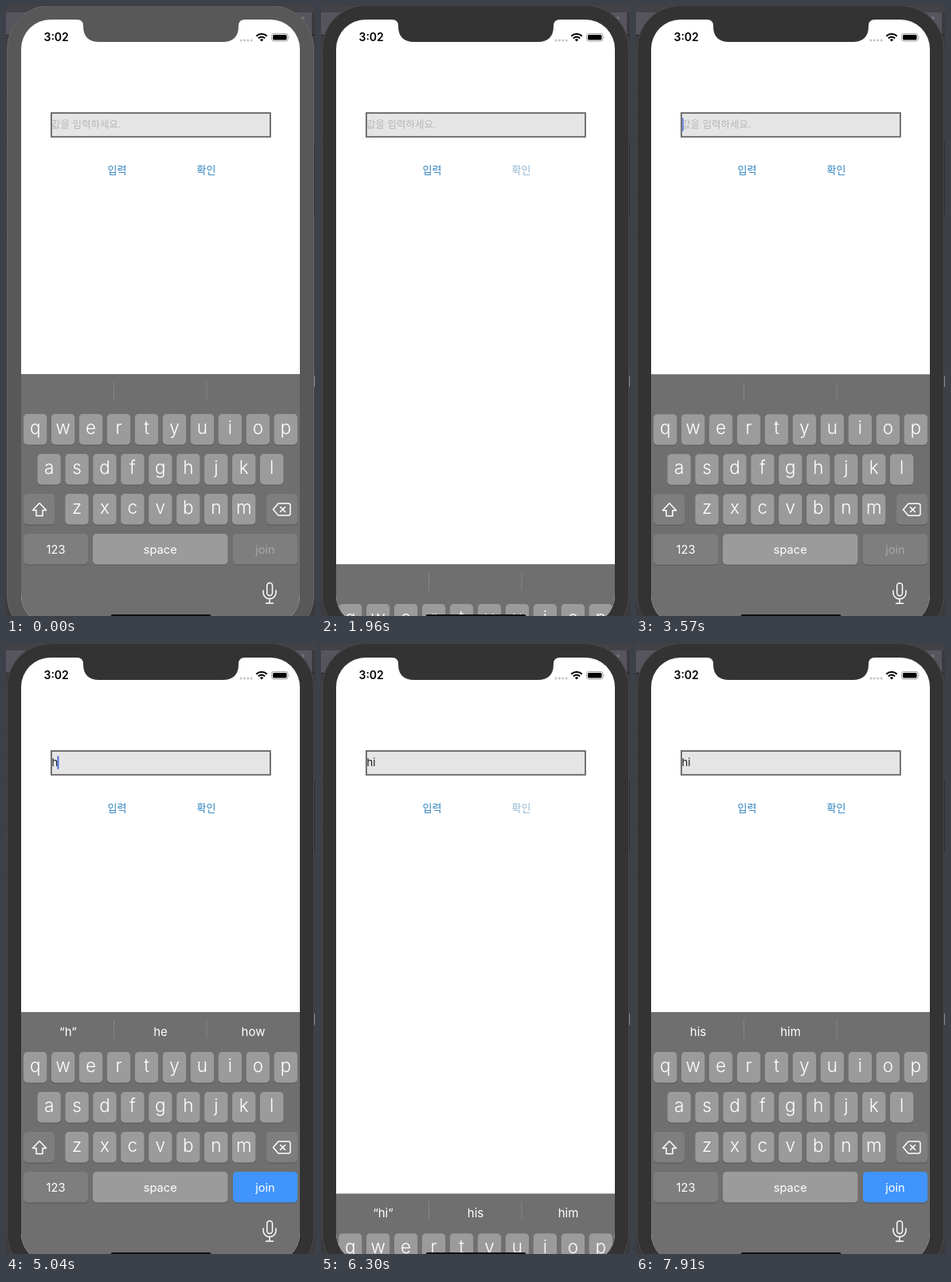
An HTML page for the animation above (8000 ms loop, 388 by 764 pixels).

```html
<!DOCTYPE html>
<html lang="ko">
<head>
<meta charset="utf-8">
<title>Text field and keyboard</title>
<style>
html, body { margin: 0; width: 100%; height: 100%; overflow: hidden; background: #3b3a3e; }
svg { display: block; width: 388px; height: 764px; }
text { font-family: Inter, "Noto Sans", sans-serif; white-space: pre; }
.ko { font-family: "Noto Sans CJK KR", "Noto Sans CJK JP", "Noto Sans CJK", sans-serif; }
.mid { text-anchor: middle; }
.letter { font-size: 22.5px; font-weight: 300; }
.label { font-size: 14.6px; }
.line { fill: none; stroke: #fff; stroke-width: 1.5; stroke-linejoin: round; stroke-linecap: round; }
</style>
</head>
<body>
<svg viewBox="0 0 388 764" xmlns="http://www.w3.org/2000/svg">
  <defs>
    <clipPath id="screen"><rect x="19" y="17" width="350" height="758" rx="37"/></clipPath>
  </defs>

  <!-- window behind the phone -->
  <rect width="388" height="764" fill="#3b3a3e"/>
  <rect width="388" height="8" fill="#434247"/>
  <rect y="8" width="384" height="28" fill="#56545d"/>
  <path d="M0 36.5H388M0 110.5H3M0 142.5H3M0 169.5H3M0 234.5H3M0 290.5H3" stroke="#242424"/>
  <path d="M369 15h5m-2-2.5l2.500 2.500l-2.500 2.500" fill="none" stroke="#85838b"/>
  <rect x="386" y="463" width="2" height="14" fill="#8a8a8a"/>
  <rect x="385" y="170" width="3" height="92" fill="#2a2a2a"/>

  <!-- phone body -->
  <rect id="body" x="1.500" y="-.5" width="385" height="793" rx="54" stroke-width="1"/>

  <g clip-path="url(#screen)">
    <rect x="19" y="17" width="350" height="758" fill="#fff"/>

    <rect x="56.900" y="134" width="275" height="29.800" fill="#e5e5e5" stroke="#646464" stroke-width="1.800"/>
    <text id="hint" class="ko" x="57" y="152.500" font-size="12.500" fill="#b7b7b7">값을 입력하세요.</text>
    <text id="typed" x="57.500" y="153" font-size="13" fill="#161616"></text>
    <rect id="caret" y="140" width="2" height="17" rx="1" fill="#4a6fdf"/>

    <text id="enter" class="ko mid" x="139.500" y="210" font-size="13">입력</text>
    <text id="confirm" class="ko mid" x="251.500" y="210" font-size="13">확인</text>

    <g id="keyboard">
      <rect x="19" y="461" width="350" height="320" fill="#6f6f6f"/>
      <path d="M135.500 471V494M252 471V494" stroke="#858585"/>
      <g id="words" fill="#fff"></g>
      <g id="keys"></g>
      <path class="line" d="M42 622.500L50.500 631.500H46V638.500H38V631.500H33.500Z"/>
      <path class="line" d="M342 623H354.500Q357 623 357 625.500V635.500Q357 638 354.500 638H342L335.500 630.500Z
        M344.500 627.500l6 6m0-6l-6 6"/>
      <rect class="line" x="327.700" y="722.500" width="6.800" height="16" rx="3.400"/>
      <path class="line" d="M323 732V734.500A8 8 0 0 0 339 734.500V732M331 742.500V748M326.500 748H335.500"/>
    </g>
    <rect x="131.500" y="762" width="126" height="5" rx="2.500" fill="#111"/>
  </g>

  <path id="notch" d="M87 16H303V17H300Q292 17 292 25V25Q292 45 272 45H117Q97 45 97 25V25Q97 17 89 17Z"/>

  <!-- status bar -->
  <text x="47.500" y="44" font-size="14" font-weight="600">3:02</text>
  <g id="dots" fill="#c4c4c4"></g>
  <g fill="none" stroke="#000" stroke-width="2.100">
    <path d="M314.300 37.800A9.500 9.500 0 0 1 327.700 37.800"/>
    <path d="M316.900 40.500A5.800 5.800 0 0 1 325.100 40.500"/>
  </g>
  <path d="M321 44.500L318.800 42.300A3.100 3.100 0 0 1 323.200 42.300Z"/>
  <rect x="333.500" y="34.500" width="20.500" height="9.500" rx="2.800" fill="none" stroke="#a2a2a2"/>
  <rect x="335" y="36" width="17.500" height="6.500" rx="1.500"/>
  <path d="M355.300 37.700Q357 39.200 355.300 40.800Z" fill="#a2a2a2"/>
</svg>

<script>
const LOOP = 8000, STEP = 70, TRAVEL = 314;
const $ = id => document.getElementById(id);

function add(parent, tag, attrs, content = '') {
  const el = document.createElementNS('http://www.w3.org/2000/svg', tag);
  for (const name in attrs) el.setAttribute(name, attrs[name]);
  el.textContent = content;
  return parent.appendChild(el);
}

const LETTER = '#9b9b9b', SPECIAL = '#7e7e7e', BLUE = '#4094fc';

function key(x, y, width, fill, text = '', cls = 'label', drop = 24.5) {
  const box = { x, width, height: 38.5, rx: 4.7 };
  add($('keys'), 'rect', { ...box, y: y + 1, fill: '#575757' });
  const face = add($('keys'), 'rect', { ...box, y, fill });
  const label = add($('keys'), 'text',
    { x: x + width / 2, y: y + drop, class: 'mid ' + cls, fill: '#fff' }, text);
  return { face, label };
}

[['qwertyuiop', 22, 511], ['asdfghjkl', 39.4, 561], ['zxcvbnm', 74.3, 611]].forEach(([row, x, y]) =>
  [...row].forEach((c, i) => key(x + i * 34.95, y, 29.4, LETTER, c, 'letter', 25)));
key(22, 611, 39, SPECIAL);
key(327, 611, 39, SPECIAL);
key(22, 661, 81, SPECIAL, '123');
key(109, 661, 169.5, LETTER, 'space');
const join = key(285, 661, 81, SPECIAL, 'join');

const words = [78, 194, 310.5].map(x =>
  add($('words'), 'text', { x, y: 490.5, class: 'mid', 'font-size': 15 }));
for (let i = 0; i < 4; i++) add($('dots'), 'circle', { cx: 295 + i * 4.4, cy: 43, r: 1.5 });

// [time, value...] tables; each value holds until the next row
const typing = [[0, ''], [4900, 'h'], [5460, 'hi']];
const suggestions = [
  [0, '', '', ''], [4970, '“h”', 'he', 'how'], [5530, '“hi”', 'his', 'him'],
  [7050, '', '', ''], [7560, 'his', 'him', '']
];
const slides = [[-1000, 0], [1810, 1], [3050, 0], [6160, 1], [7050, 0]];
const presses = {
  enter: [[2940, 3060], [6860, 7050]],
  confirm: [[1750, 1810], [6020, 6160]]
};
// [time, opacity], linear in between
const blink = [
  [0, 0], [280, 0], [420, 1], [840, 1], [1120, 0], [1330, 0], [1470, 1], [1610, 1], [1820, 0],
  [3049, 0], [3050, 1], [3500, 1], [3790, 0], [4160, 0], [4340, 1], [4540, 1], [4830, 0],
  [4899, 0], [4900, 1], [5900, 1], [6160, 0], [7049, 0], [7050, 1], [7480, 1], [7770, 0], [LOOP, 0]
];

const current = (table, t) => table.filter(row => row[0] <= t).pop();

function ramp(table, t) {
  const i = table.findIndex(row => row[0] > t);
  const [t0, a] = table[i - 1], [t1, b] = table[i];
  return a + (b - a) * (t - t0) / (t1 - t0);
}

// critically damped spring from 0 to 1
function spring(ms) {
  const u = ms * 0.01826;
  return 1 - (1 + u) * Math.exp(-u);
}

function buttonColor(spans, t) {
  let lit = 1;
  for (const [down, up] of spans)
    if (t >= down) lit = Math.min(1, Math.max(0, (t - up) / 350));
  const mix = (a, b) => Math.round(a + (b - a) * lit);
  return `rgb(${mix(220, 45)},${mix(221, 130)},${mix(222, 190)})`;
}

function render(t) {
  const active = t >= 1750;
  const shell = active ? '#333333' : '#585858';
  $('body').setAttribute('fill', shell);
  $('body').setAttribute('stroke', active ? '#4b4b4b' : '#666666');
  $('notch').setAttribute('fill', shell);

  const [start, hidden] = current(slides, t);
  const p = spring(t - start);
  const shift = TRAVEL * (hidden ? p : 1 - p);
  $('keyboard').setAttribute('transform', `translate(0 ${shift.toFixed(2)})`);

  const value = current(typing, t)[1];
  $('typed').textContent = value;
  $('hint').style.display = value ? 'none' : '';
  $('caret').setAttribute('x', [57.8, 64.4, 68.4][value.length]);
  $('caret').setAttribute('opacity', ramp(blink, t));

  const row = current(suggestions, t);
  words.forEach((word, i) => word.textContent = row[i + 1]);
  join.face.setAttribute('fill', value ? BLUE : SPECIAL);
  join.label.setAttribute('fill', value ? '#fff' : '#a9a9a9');

  for (const id in presses) $(id).setAttribute('fill', buttonColor(presses[id], t));
}

const begin = performance.now();
function tick() {
  const t = (performance.now() - begin) % LOOP;
  render(Math.floor((t + 0.01) / STEP) * STEP);
  requestAnimationFrame(tick);
}
tick();
</script>
</body>
</html>
```
